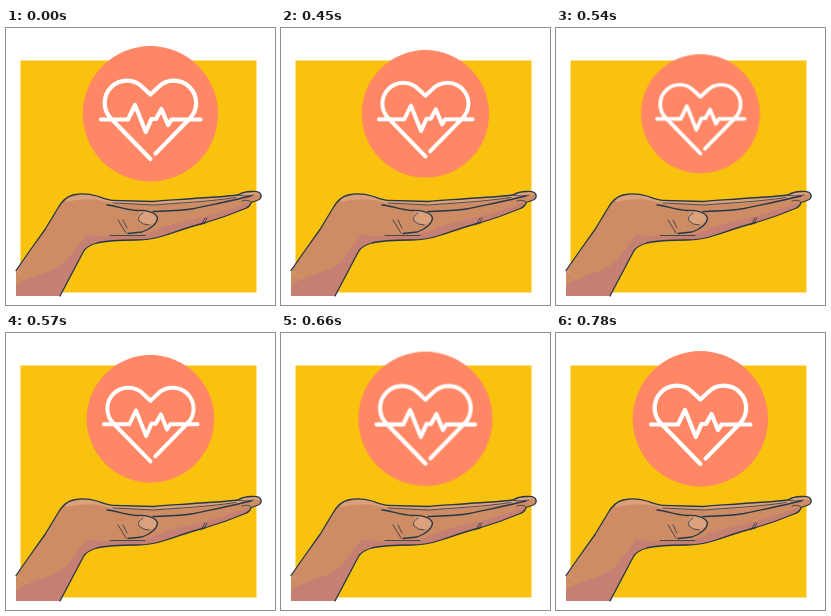
An HTML page for the animation above (0.9 s loop, 269 by 277 pixels).

```html
<!DOCTYPE html>
<html lang="en">
<head>
<meta charset="utf-8">
<title>Heartbeat over an open hand</title>
<style>
  html, body { margin: 0; width: 100%; height: 100%; overflow: hidden; background: #fff; }
  svg { display: block; width: 100vw; height: 100vh; }
  #badge { transform-box: view-box; transform-origin: 144.4px 85.8px; }
  .ink { fill: none; stroke: #263746; stroke-width: 1.3; stroke-linecap: round; stroke-linejoin: round; }
  .fine { stroke-width: .8; }
  .icon { fill: none; stroke: #fff; stroke-width: 4.2; stroke-linecap: round; stroke-linejoin: round; }
</style>
</head>
<body>
<svg viewBox="0 0 269 277">
  <defs>
    <path id="outline" d="M10 242.5 L24 222.5 L39 201.5 L52 180 C56 173 61 168.5 67 167 C74 165.3 84 166 91 168
      C97 170 101 172 107 172.3 L147 173.5 C158 172 178 171.5 194 170 C208 169 222 168.5 232 167
      C236 164.5 240 163.3 246 163.5 Q254 163 255 167 Q256 171 251 172.5 L245 174.5 Q244 179 238 181
      C226 186 212 191 200 194.5 C186 198 172 203 160 207 C150 210.5 142 212 130 212
      C114 212 101 212.5 91 215 C84 217 80 219 77.5 223.5 L54 268"/>
    <clipPath id="inside"><use href="#outline"/></clipPath>
  </defs>

  <rect x="14.5" y="32.5" width="236" height="232" fill="#f9c20f"/>

  <g id="hand">
    <path fill="#ce8c64" d="M10 242.5 L54 268 H10 Z"/>
    <use href="#outline" fill="#ce8c64"/>
    <path fill="#c67f73" d="M10 257 C23 248 38 247 54 238 L69 240 L54 268 H10 Z"/>
    <g clip-path="url(#inside)">
      <path fill="#c67f73" d="M54 238 C65 230 72 217 80 207 C100 208 132 211 151 202
        C166 194 198 192 243 174 V184 L150 222 L70 240 Z"/>
      <path fill="#dba17d" d="M60 170 L90 164 L107 171 L148 172 L232 164 L255 163 V166
        L234 170 L190 175 L148 177 L107 176 C93 170 78 170 60 174 Z"/>
    </g>
    <path fill="#dba17d" d="M134 185 C140 182 150 184 151 190 C150 196 142 198 135 195 C131 192 131 188 134 185 Z"/>
    <g class="ink">
      <use href="#outline"/>
      <path d="M101 177 C111 178 119 182 131 182.5 C140 182 150 184 151.5 190 C151 197 144 201 136 204 L122 205.5"/>
      <path d="M147 183.5 C160 183 174 183 188 180.5 C204 177 221 174 236 170 L245 168"/>
    </g>
    <g class="ink fine">
      <path d="M137 185 Q131 188 133 193 Q137 197 143 197 M112 192 L120 205 M117 192 L121 200
        M104 207.5 H139 M107 175 L148 177 C172 175 200 174 230 169.5 M195 197 L199 190 M198 196 L201 190
        M232 167 Q239 169 248 167 M245 174 Q242 171 236 173"/>
    </g>
  </g>

  <g id="badge">
    <circle cx="144.4" cy="85.8" r="67.7" fill="#ff8766"/>
    <path class="icon" d="M144.4 131 L105.2 90.7 A22.2 22.2 0 0 1 136.6 59.2 L144.4 66.5
      L152.2 59.2 A22.2 22.2 0 0 1 183.6 90.7 L149.5 125.6"/>
    <path class="icon" d="M95 91.5 H122 L129 77 L139.8 104 L145.5 91 H150 L155.5 81 L162 97 L165.5 91.5 H194.5"/>
  </g>
</svg>
<script>
  const LOOP = 900, START = 420, STEP = 30, REST = 67.7;
  // Badge radius at each step: a sharp swell, a squeeze, then settling.
  const radii = [73, 63.7, 61.2, 60, 59.5, 63.8, 66.4, 66.8, 67.1, 67.3, 67.5, 67.6, REST];
  const pose = (time, r) => ({
    offset: time / LOOP,
    transform: `scale(${r / REST})`,
    easing: 'step-end'
  });

  document.getElementById('badge').animate([
    pose(0, REST),
    ...radii.map((r, i) => pose(START + i * STEP, r)),
    pose(LOOP, REST)
  ], { duration: LOOP, iterations: Infinity });
</script>
</body>
</html>
```
